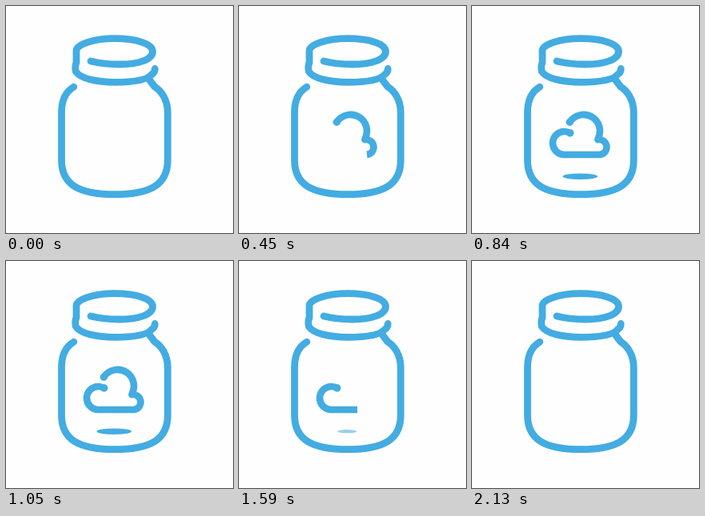
These frames come from a looping animation (284 px wide and 284 px high, 2.19 s). An HTML page with a canvas:

```html
<!DOCTYPE html>
<html lang="en">
<head>
<meta charset="utf-8">
<title>Cloud in a jar</title>
<style>
html, body { margin: 0; width: 100%; height: 100%; overflow: hidden; background: #fefefe; }
canvas { display: block; width: 284px; height: 284px; }
</style>
</head>
<body>
<canvas id="stage"></canvas>
<script>
const SIZE = 284, LOOP = 2190, STEP = 30, LAST = 2130;
const BLUE = '#43ace2';
const canvas = document.getElementById('stage');
const ctx = canvas.getContext('2d');
const dpr = window.devicePixelRatio || 1;
canvas.width = canvas.height = Math.round(SIZE * dpr);

const lid = new Path2D(
  'M106 69C118 72 130 73 142 73C166 73 183.5 67 183.5 57C183.5 47 162 40.7 136 40.7' +
  'C110 40.7 88 48 88 56L88 71C86.5 74 86.5 78 87.3 82C93 91 114 95.3 136 95.3' +
  'C158 95.3 176 93 182 86C185 84 186.3 82 186.3 78.5');
const body = new Path2D(
  'M84.8 101.2C75 107 69.5 118 69.5 133L69.5 193C69.5 224 92 235.7 136 235.7' +
  'C180 235.7 202.3 224 202.3 193L202.3 133C202.3 117 194 106 186 101L179.5 92.5');

// Cloud outline: three arcs joined by straight lines (angles in degrees).
const arcs = [
  { x: 139.5, y: 156.4, r: 20.5, from: 213, to: 384 },
  { x: 159, y: 176.5, r: 9.5, from: -100, to: 90 },
  { x: 115.5, y: 171.5, r: 14.5, from: 90, to: 300 }
];
const rad = d => d * Math.PI / 180;
const at = (c, d) => [c.x + c.r * Math.cos(rad(d)), c.y + c.r * Math.sin(rad(d))];
const cloud = new Path2D();
let total = 0, prev = null;
for (const c of arcs) {
  const p = at(c, c.from);
  if (prev) total += Math.hypot(p[0] - prev[0], p[1] - prev[1]);
  cloud.arc(c.x, c.y, c.r, rad(c.from), rad(c.to));
  total += c.r * rad(c.to - c.from);
  prev = at(c, c.to);
}
const head = at(arcs[0], arcs[0].from), tail = prev;

const ramp = (t, start, length) => Math.min(1, Math.max(0, (t - start) / length));

function dot([x, y], r) {
  ctx.beginPath();
  ctx.arc(x, y, r, 0, 2 * Math.PI);
  ctx.fill();
}

function drawJar() {
  ctx.lineWidth = 8.8;
  ctx.lineCap = 'round';
  ctx.stroke(lid);
  ctx.stroke(body);
}

function drawCloud(t) {
  const a = ramp(t, 1177, 750), b = ramp(t, 84, 750);
  if (b <= a) return;
  ctx.lineWidth = 8.6;
  ctx.lineCap = 'butt';
  ctx.setLineDash([(b - a) * total, 2 * total]);
  ctx.lineDashOffset = -a * total;
  ctx.stroke(cloud);
  ctx.setLineDash([]);
  if (a === 0) dot(head, 4.7);
  if (b === 1) dot(tail, 4.7);
}

function drawShadow(t) {
  const left = 1 - ramp(t, 1470, 270);
  const alpha = ramp(t, 480, 270) * left;
  if (alpha <= 0) return;
  ctx.globalAlpha = alpha;
  ctx.beginPath();
  ctx.ellipse(135.3, 213.2, 21.8, 3.8 * left, 0, 0, 2 * Math.PI);
  ctx.ellipse(135.3, 213.2, 21.8 * left, 3.8 * left, 0, 0, 2 * Math.PI);
  ctx.beginPath();
  ctx.ellipse(135.3, 213.2, 21.8 * left, 3.8 * left, 0, 0, 2 * Math.PI);
  ctx.fill();
  ctx.globalAlpha = 1;
}

function frame() {
  const now = performance.now() % LOOP;
  const t = Math.min(LAST, Math.floor(now / STEP) * STEP);
  ctx.setTransform(dpr, 0, 0, dpr, 0, 0);
  ctx.fillStyle = '#fefefe';
  ctx.fillRect(0, 0, SIZE, SIZE);
  ctx.fillStyle = ctx.strokeStyle = BLUE;
  ctx.lineJoin = 'round';
  drawJar();
  drawCloud(t);
  drawShadow(t);
  requestAnimationFrame(frame);
}
frame();
</script>
</body>
</html>
```
